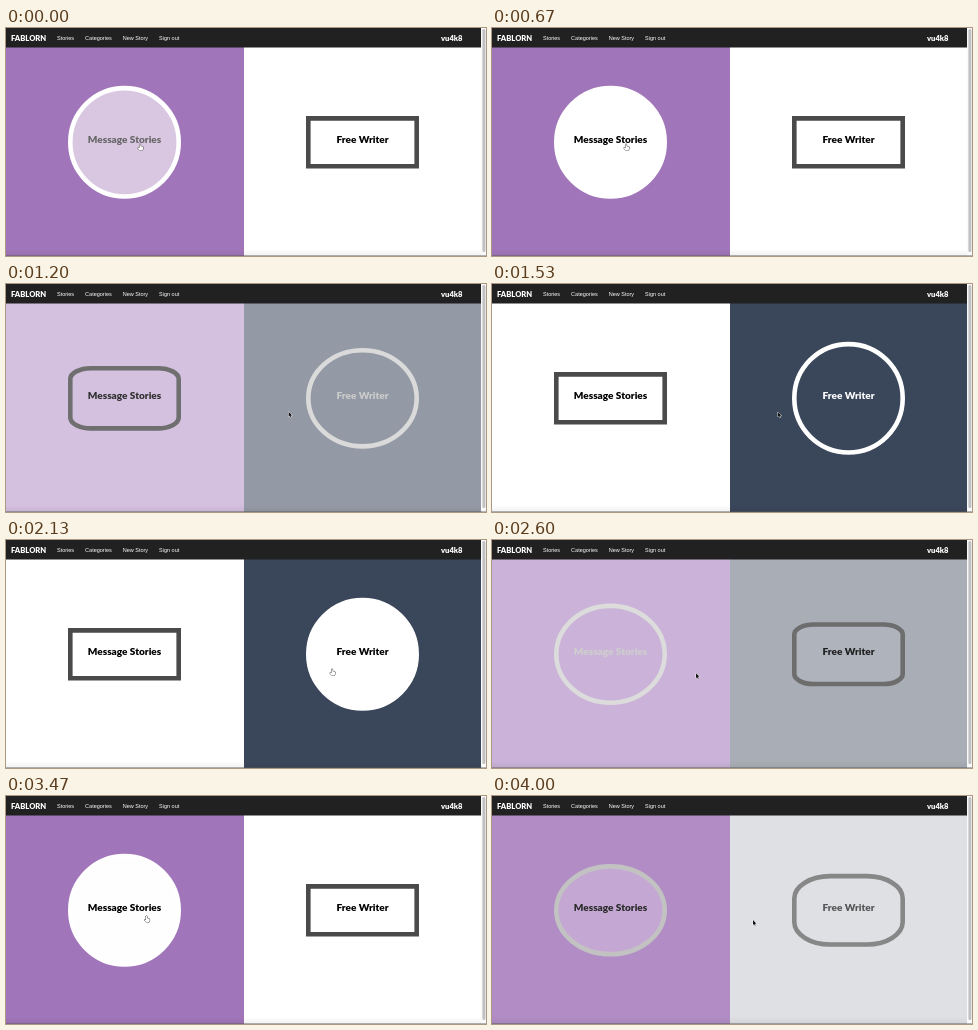
An HTML page with a canvas that plays this animation: 480 px wide and 228 px high, repeating every 4.07 s.

```html
<!DOCTYPE html>
<html lang="en">
<head>
<meta charset="utf-8">
<title>Story chooser</title>
<style>
html, body { margin: 0; width: 100%; height: 100%; overflow: hidden; background: #fff; }
canvas { display: block; width: 480px; height: 228px; }
</style>
</head>
<body>
<canvas></canvas>
<script>
const W = 480, H = 228, LOOP = 4070, STEP = 200 / 3;
const PAGE_W = 475, HALF = 238, NAV_H = 19.5;
const LEFT_X = 118.5, RIGHT_X = 356.5, BUTTON_Y = 114.3;
const WHITE = [255, 255, 255], BLACK = [0, 0, 0], GRAY = [74, 74, 74];
const PURPLE = [161, 117, 185], SLATE = [58, 70, 90];
const FADE = 500, MORPH = 320, INK_HOLD = 140;

const canvas = document.querySelector('canvas');
const ctx = canvas.getContext('2d');
const dpr = window.devicePixelRatio || 1;
canvas.width = W * dpr;
canvas.height = H * dpr;

const mix = (a, b, p) => a + (b - a) * p;
const clamp01 = x => Math.min(1, Math.max(0, x));
const rgb = (a, b, p) => `rgb(${a.map((v, i) => Math.round(mix(v, b[i], p))).join()})`;

// The CSS "ease" curve: cubic-bezier(.25, .1, .25, 1).
function ease(x) {
  if (x <= 0) return 0;
  if (x >= 1) return 1;
  const bezier = (p1, p2, s) => 3 * p1 * s * (1 - s) ** 2 + 3 * p2 * s * s * (1 - s) + s ** 3;
  let lo = 0, hi = 1;
  for (let i = 0; i < 24; i++) {
    const mid = (lo + hi) / 2;
    if (bezier(.25, .25, mid) < x) lo = mid; else hi = mid;
  }
  return bezier(.1, 1, lo);
}

// Switches between 0 and 1 at each time, easing on from the value reached so far.
function toggle(t, duration, times) {
  return times.reduce((value, start, i) => {
    const end = Math.min(t, times[i + 1] ?? t);
    return mix(value, i % 2 ? 0 : 1, ease((end - start) / duration));
  }, 0);
}

// Times at which the pointer crosses the middle, and enters and leaves each button.
const crossings = [1042, 2438, 3930];
const leftVisits = [-172, 700, 3030, 3770];
const rightVisits = [1650, 2270];
const hover = (t, visits, hold = 0) =>
  toggle(t, FADE, visits.map((time, i) => i % 2 ? time + hold : time));

const glides = [
  { from: 670, to: 1530, x: 286, y: 128 },
  { from: 1600, to: 2100, x: 325.5, y: 129 },
  { from: 2230, to: 3000, x: 194.5, y: 133.5 },
  { from: 3000, to: 3270, x: 140, y: 120 },
  { from: 3670, to: 4000, x: 261, y: 124 }
];

function pointerAt(t) {
  return glides.reduce((p, g) => {
    const k = 1 - (1 - clamp01((t - g.from) / (g.to - g.from))) ** 4;
    return { x: mix(p.x, g.x, k), y: mix(p.y, g.y, k) };
  }, { x: 133.5, y: 116 });
}

function text(label, x, y, font, color, align = 'left') {
  ctx.font = font;
  ctx.fillStyle = color;
  ctx.textAlign = align;
  ctx.fillText(label, x, y);
}

// A box that grows into a circle as "round" goes from 0 to 1.
function button(label, cx, round, fill, ink) {
  const line = 4.6, inset = line / 2, w = 113, h = mix(52.5, w, round);
  const r = Math.min(.5, round);
  ctx.beginPath();
  ctx.roundRect(cx - w / 2 + inset, BUTTON_Y - h / 2 + inset, w - line, h - line,
    { x: Math.max(0, w * r - inset), y: Math.max(0, h * r - inset) });
  ctx.fillStyle = `rgba(255,255,255,${fill})`;
  ctx.fill();
  ctx.lineWidth = line;
  ctx.strokeStyle = rgb(GRAY, WHITE, round);
  ctx.stroke();
  text(label, cx, 115, '900 10.05px Lato, sans-serif', rgb(WHITE, BLACK, ink), 'center');
}

function choice(t, label, cx, round, visits) {
  const ink = 1 - round * (1 - hover(t, visits, INK_HOLD));
  button(label, cx, round, hover(t, visits), ink);
}

function arrow(x, y) {
  const shape = new Path2D('M0 0V5L1.1 4L1.9 5.8L2.7 5.4L1.9 3.7H3.4Z');
  paintPointer(shape, x, y, '#111', 'rgba(255,255,255,.8)');
}

function hand(x, y) {
  const shape = new Path2D('M0 0H1L1.2 2.2L3.6 2.8V4.6L3 6.4H.2L-1.7 3.9L-1 3.4L0 4.2Z');
  paintPointer(shape, x, y, '#fff', '#444');
}

function paintPointer(shape, x, y, fill, edge) {
  ctx.save();
  ctx.translate(x, y);
  ctx.lineJoin = 'round';
  ctx.lineWidth = 1;
  ctx.strokeStyle = edge;
  ctx.stroke(shape);
  ctx.fillStyle = fill;
  ctx.fill(shape);
  ctx.restore();
}

function pointer(t) {
  const { x, y } = pointerAt(t);
  const overButton = [LEFT_X, RIGHT_X].some(cx => Math.hypot(x - cx, y - BUTTON_Y) < 56);
  (overButton ? hand : arrow)(x, y);
}

function navbar() {
  ctx.fillStyle = '#212121';
  ctx.fillRect(0, 0, PAGE_W, NAV_H);
  const brand = '900 7.6px Lato, sans-serif';
  text('FABLORN', 5, 13.3, brand, '#fff');
  text('vu4k8', 456.5, 13.3, brand, '#fff', 'right');
  const font = '5.5px "Liberation Sans", Arial, sans-serif';
  let x = 51;
  for (const label of ['Stories', 'Categories', 'New Story', 'Sign out']) {
    text(label, x, 12.3, font, '#fff');
    x += ctx.measureText(label).width + 11;
  }
}

function windowEdges() {
  ctx.fillStyle = '#fafafa';
  ctx.fillRect(PAGE_W, 0, W - PAGE_W, H);
  ctx.fillStyle = '#c1c1c1';
  ctx.beginPath();
  ctx.roundRect(476.4, 1, 3, 223, 1.5);
  ctx.fill();
  const shade = ctx.createLinearGradient(0, 221, 0, H);
  shade.addColorStop(0, 'rgba(0,0,0,0)');
  shade.addColorStop(1, 'rgba(0,0,0,.06)');
  ctx.fillStyle = shade;
  ctx.fillRect(0, 221, PAGE_W, H - 221);
  ctx.fillStyle = 'rgba(90,90,90,.45)';
  ctx.fillRect(0, 227, W, 1);
}

function draw(t) {
  ctx.setTransform(dpr, 0, 0, dpr, 0, 0);
  const tint = toggle(t, FADE, crossings), shape = toggle(t, MORPH, crossings);
  ctx.fillStyle = rgb(PURPLE, WHITE, tint);
  ctx.fillRect(0, 0, HALF, H);
  ctx.fillStyle = rgb(WHITE, SLATE, tint);
  ctx.fillRect(HALF, 0, PAGE_W - HALF, H);
  choice(t, 'Message Stories', LEFT_X, 1 - shape, leftVisits);
  choice(t, 'Free Writer', RIGHT_X, shape, rightVisits);
  navbar();
  windowEdges();
  pointer(t);
}

// The picture advances fifteen times a second.
function tick() {
  const t = performance.now() % LOOP;
  draw(Math.min(60, Math.floor((t + 5) / STEP)) * STEP);
  requestAnimationFrame(tick);
}
tick();
</script>
</body>
</html>
```
